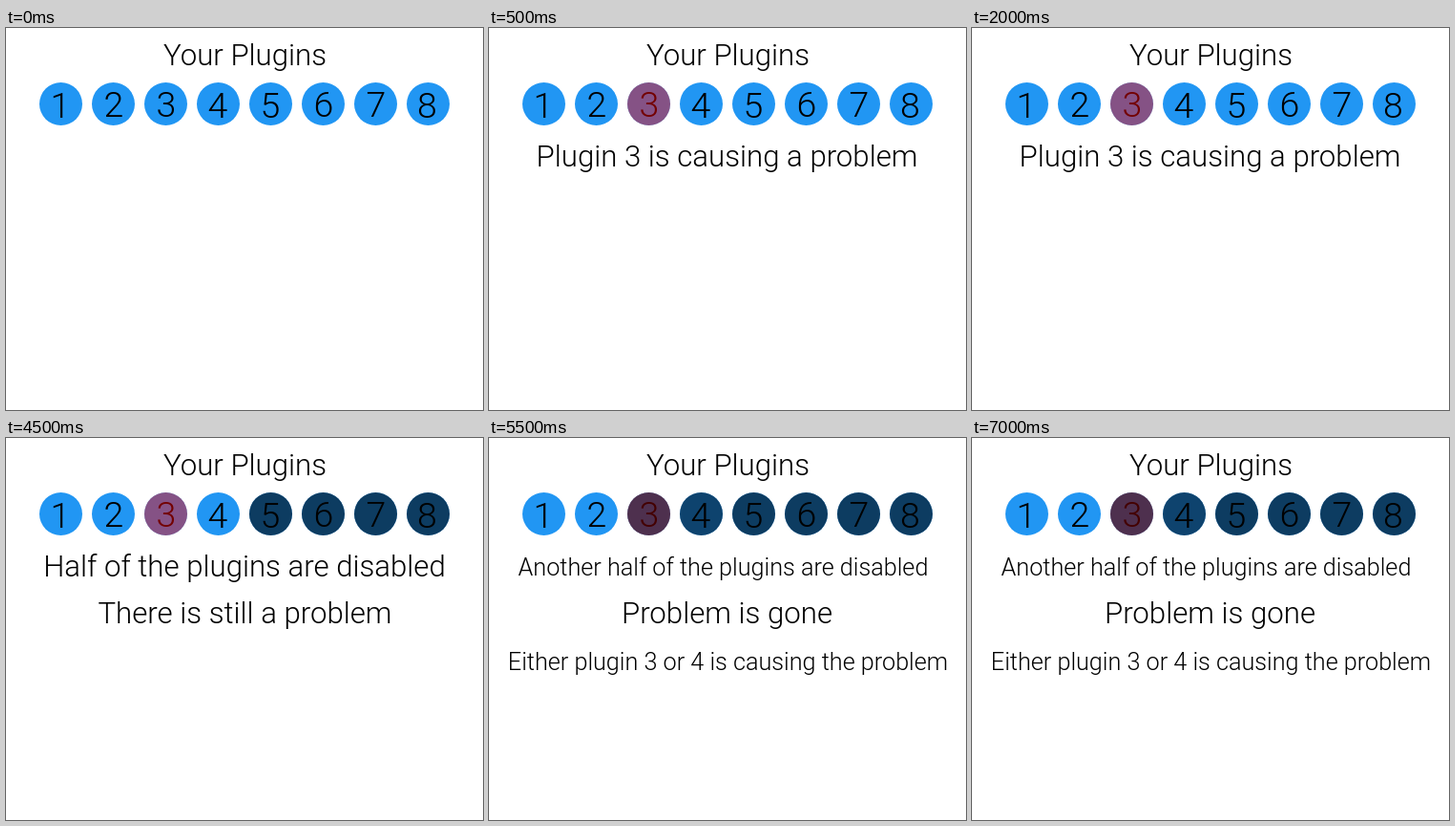
Animation of 500x400 px, one loop 8000 ms. Source, as an HTML page:

```html
<!DOCTYPE html>
<html lang="en">
<head>
<meta charset="utf-8">
<title>Your Plugins</title>
<style>
  html, body { margin: 0; width: 100%; height: 100%; overflow: hidden; background: #fff; }
  svg { display: block; width: 500px; height: 400px; }
  text {
    font-family: Roboto, Inter, sans-serif;
    font-weight: 300;
    font-size: 31.2px;
    text-anchor: middle;
  }
  .digit { font-size: 37.5px; }
  .small { font-size: 25.2px; }
  .plugin { fill: #2196f3; }
  .faulty { fill: #f00; fill-opacity: .45; }
  .off { fill-opacity: .6; }
  .late { fill-opacity: .55; }
  .dim { fill-opacity: .41; }

  .problem, .half, .quarter, .fault, .halved { animation: 8s step-end infinite; }
  .problem { animation-name: problem; }
  .half { animation-name: half; }
  .quarter { animation-name: quarter; }
  .fault { animation-name: fault; }
  .halved { animation-name: halved; }

  @keyframes problem { 0% { opacity: 0 } 6.25% { opacity: 1 } 37.5%, 100% { opacity: 0 } }
  @keyframes half { 0% { opacity: 0 } 37.5% { opacity: 1 } 68.75%, 100% { opacity: 0 } }
  @keyframes quarter { 0% { opacity: 0 } 68.75%, 100% { opacity: 1 } }
  @keyframes fault { 0% { opacity: 0 } 6.25%, 100% { opacity: 1 } }
  @keyframes halved { 0% { opacity: 0 } 37.5%, 100% { opacity: 1 } }
</style>
</head>
<body>
<svg viewBox="0 0 500 400">
  <defs><circle id="dot" cy="79.5" r="22.5"/></defs>
  <text x="250.5" y="39">Your Plugins</text>

  <g class="plugin">
    <use href="#dot" x="57.5"/><use href="#dot" x="112.5"/>
    <use href="#dot" x="167.5"/><use href="#dot" x="222.5"/>
    <use href="#dot" x="277.5"/><use href="#dot" x="332.5"/>
    <use href="#dot" x="387.5"/><use href="#dot" x="442.5"/>
  </g>
  <g>
    <text class="digit" x="57" y="93.5">1</text>
    <text class="digit" x="113" y="92.5">2</text>
    <text class="digit" x="168" y="92.5">3</text>
    <text class="digit" x="222" y="93.5">4</text>
    <text class="digit" x="277" y="93.5">5</text>
    <text class="digit" x="333" y="92.5">6</text>
    <text class="digit" x="388" y="92.5">7</text>
    <text class="digit" x="441.5" y="93.5">8</text>
  </g>

  <g class="fault"><use class="faulty" href="#dot" x="167.5"/></g>
  <g class="halved off">
    <use href="#dot" x="277.5"/><use href="#dot" x="332.5"/>
    <use href="#dot" x="387.5"/><use href="#dot" x="442.5"/>
  </g>
  <g class="quarter">
    <use class="dim" href="#dot" x="167.5"/>
    <use class="late" href="#dot" x="222.5"/>
  </g>

  <g class="problem">
    <text x="249.5" y="145">Plugin 3 is causing a problem</text>
  </g>
  <g class="half">
    <text x="250" y="145">Half of the plugins are disabled</text>
    <text x="250.5" y="194">There is still a problem</text>
  </g>
  <g class="quarter">
    <text class="small" x="245.5" y="144">Another half of the plugins are disabled</text>
    <text x="249.5" y="194">Problem is gone</text>
    <text class="small" x="250.5" y="243">Either plugin 3 or 4 is causing the problem</text>
  </g>
</svg>
</body>
</html>
```
